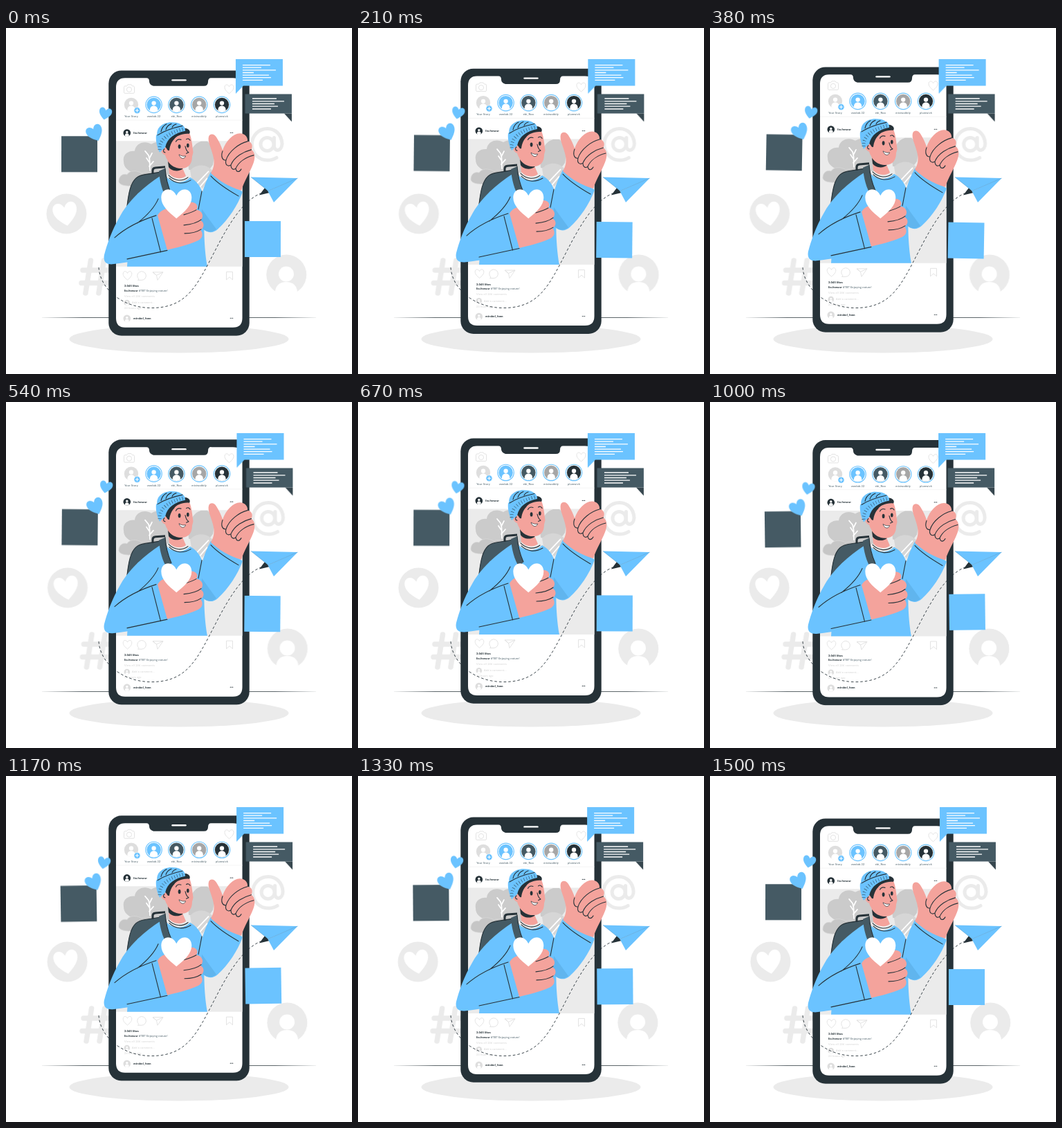
An HTML page that plays this animation: 500 px wide and 500 px high, repeating every 1540 ms.

```html
<!DOCTYPE html>
<html lang="en">
<head>
<meta charset="utf-8">
<title>Social phone</title>
<style>
  html, body { margin: 0; width: 100%; height: 100%; overflow: hidden; background: #fff; }
  svg { display: block; width: 100vw; height: 100vh; }
  text { font-family: Lato, sans-serif; font-size: 3.9px; letter-spacing: .2px; fill: #455a64; }
  .b { font-weight: 900; fill: #263238; }
  .pale text { fill: #d2d2d2; }
  .mid { text-anchor: middle; }
  .ink { fill: none; stroke: #263238; stroke-width: 1.1; stroke-linecap: round; stroke-linejoin: round; }
  .icon { fill: none; stroke: #e0e0e0; stroke-width: .9; stroke-linejoin: round; }
  .blue { fill: #6bc3ff; }
  .skin { fill: #f4a39c; }
  .gray { fill: #ebebeb; }
  .float, .shake, .wind { animation: float 1.5s linear infinite paused; transform-origin: 250px 250px; }
  .shake { animation-name: shake; }
  .wind { animation-name: wind; }
  @keyframes float { 50% { transform: translateY(-10px); } }
  @keyframes wind {
    25% { transform: rotate(1deg); }
    75% { transform: rotate(-1deg); }
  }
  @keyframes shake {
    10%, 90% { transform: translateX(-1px); }
    20%, 80% { transform: translateX(2px); }
    30%, 50%, 70% { transform: translateX(-4px); }
    40%, 60% { transform: translateX(4px); }
  }
</style>
</head>
<body>
<svg viewBox="0 0 500 500">
  <defs>
    <path id="heart" d="M0 .9C-.55 .5 -1 .1 -1 -.38C-1 -.98 -.28 -1.08 0 -.5C.28 -1.08 1 -.98 1 -.38C1 .1 .55 .5 0 .9Z"/>
    <g id="user">
      <circle r="1"/>
      <circle cy="-.22" r=".31" fill="#fff"/>
      <path d="M-.55 .83C-.57 .35 -.35 .15 0 .15S.57 .35 .55 .83A1 1 0 0 1 -.55 .83Z" fill="#fff"/>
    </g>
    <linearGradient id="fade">
      <stop offset="0" stop-color="#263238" stop-opacity=".1"/>
      <stop offset=".15" stop-color="#263238"/>
      <stop offset=".85" stop-color="#263238"/>
      <stop offset="1" stop-color="#263238" stop-opacity=".1"/>
    </linearGradient>
    <clipPath id="photo"><path d="M159 163.5H341.5V345H159Z"/></clipPath>
  </defs>

  <ellipse cx="250" cy="449.5" rx="158.5" ry="20" fill="#ebebeb"/>
  <path d="M52 418.2H448V418.9H52Z" fill="url(#fade)"/>

  <g class="shake">
    <circle class="gray" cx="87.5" cy="268.5" r="29"/>
    <use href="#heart" transform="translate(86 269) rotate(-10) scale(17.5 19)" fill="#fff"/>
    <circle class="gray" cx="405.3" cy="356.5" r="29"/>
    <circle cx="405" cy="355.5" r="11" fill="#fff"/>
    <path d="M388.5 386C388.5 373 394 367 405 367S421.5 373 421.5 386Z" fill="#fff"/>
    <path d="M122.5 336L115 383M141.5 336L134 383M111 350H151M109 368.5H149" fill="none" stroke="#ebebeb" stroke-width="7.5" stroke-linecap="round"/>
    <g fill="none" stroke="#ebebeb" stroke-width="5" stroke-linecap="round">
      <circle cx="377.5" cy="168" r="9.5"/>
      <path d="M387.5 158.500V170C387.5 180 399 178 399 167C398.5 154 389 145.5 378 145.5C365 145.5 355.5 155.5 355.5 168C355.5 181 365 191 378 191C383 191 387 190 391 187.5"/>
    </g>
  </g>

  <g class="float">
    <rect x="148.300" y="61.600" width="203.400" height="383.200" rx="18.500" fill="#263238"/>
    <path d="M172 72.500H203Q207 72.500 207 77.300T213 84H286Q292 84 292 78T297 72.500H328Q341.500 72.500 341.500 86V419.500Q341.500 433 328 433H172Q159 433 159 419.500V86Q159 72.500 172 72.500Z" fill="#fff"/>
    <path d="M240.500 75.500H259.500" stroke="#fff" stroke-width="2.400" stroke-linecap="round"/>

    <g class="icon">
      <path d="M172 84H174.500L176 82H181L182.500 84H184Q185.500 84 185.500 86V93Q185.500 94.500 184 94.500H172Q170.500 94.500 170.500 93V86Q170.500 84 172 84Z"/>
      <circle cx="178" cy="89" r="3.600"/>
      <use href="#heart" transform="translate(322.500 88.500) scale(6.500 7.200)" stroke-width=".13"/>
      <path d="M159 133.300H341.500" stroke="#efefef" stroke-width=".7"/>
      <use href="#heart" transform="translate(175.500 358) scale(6.300 7)" stroke-width=".13"/>
      <path d="M192 363A6.300 6.300 0 1 1 196 364.500L190.500 364.500Z"/>
      <path d="M212 353H227L219 364.500L217.500 357.500ZL217.500 357.500L227 353"/>
      <path d="M318.500 352.500H327.500V364L323 360L318.500 364Z"/>
    </g>

    <use href="#user" transform="translate(181 111) scale(10.200)" fill="#dedede"/>
    <circle cx="189.500" cy="119.300" r="4.600" class="blue" stroke="#fff" stroke-width=".7"/>
    <path d="M187 119.300H192M189.500 116.800V121.800" stroke="#fff" stroke-width="1"/>
    <g fill="none" stroke="#6bc3ff" stroke-width="1.200">
      <circle cx="213.600" cy="111" r="11.700"/><circle cx="246.400" cy="111" r="11.700"/>
      <circle cx="279.200" cy="111" r="11.700"/><circle cx="312" cy="111" r="11.700"/>
    </g>
    <use href="#user" transform="translate(213.600 111) scale(10.200)" fill="#6bc3ff"/>
    <use href="#user" transform="translate(246.400 111) scale(10.200)" fill="#455a64"/>
    <use href="#user" transform="translate(279.200 111) scale(10.200)" fill="#a6a6a6"/>
    <use href="#user" transform="translate(312 111) scale(10.200)" fill="#263238"/>
    <g class="mid">
      <text x="181" y="129.300">Your Story</text>
      <text x="213.600" y="129.300">vandob.32</text>
      <text x="246.400" y="129.300">ebi_Nox</text>
      <text x="279.200" y="129.300">mistwobbly</text>
      <text x="312" y="129.300">plumwick</text>
    </g>

    <use href="#user" transform="translate(174.800 151.700) scale(5.300)" fill="#263238"/>
    <text class="b" x="184.300" y="152.900">lio.fenwar</text>
    <path d="M324.300 151.500H328.500" stroke="#263238" stroke-width="1.200" stroke-linecap="round" stroke-dasharray="0 1.700"/>

    <text class="b" x="171" y="374.500">3.045 likes</text>
    <text x="171" y="381"><tspan class="b">lio.fenwar</tspan> #TBT Enjoying nature!</text>
    <g class="pale">
      <text x="171" y="389">View all 246 comments</text>
      <use href="#user" transform="translate(174.800 397.300) scale(4.300)" fill="#dedede"/>
      <text x="182" y="398.500">Add a comment...</text>
      <text x="171" y="406.500">24 hours ago</text>
    </g>
    <use href="#user" transform="translate(174.800 420) scale(5.300)" fill="#dedede"/>
    <text class="b" x="184.300" y="421">mirabel_fonn</text>
    <path d="M324.300 419.500H328.500" stroke="#263238" stroke-width="1.200" stroke-linecap="round" stroke-dasharray="0 1.700"/>

    <g clip-path="url(#photo)">
      <path d="M159 163H342V346H159Z" class="gray"/>
      <path d="M170 193C168 183 177 177 186 178C187 167 200 162 210 168C222 160 242 168 240 182V212H190C176 207 170 202 170 193Z" fill="#cbcbcb"/>
      <path d="M163 222C163 214 169 210 175 212C179 205 190 206 196 210C206 206 216 210 218 218L206 229C190 227 165 232 163 222Z" fill="#c6c6c6" stroke="#d9d9d9" stroke-width=".8"/>
      <path d="M264 205C262 185 268 168 282 164H291C300 171 302 185 299 198L290 210Z" fill="#cbcbcb"/>
      <path d="M266 206C276 196 290 196 300 208L284 232L268 218Z" fill="#d6d6d6"/>
      <path d="M208 206C207 196 209 192 206 184L201 178M207 189L211 181M207 194L203 188M207 200L213 193" fill="none" stroke="#fff" stroke-width="1.700" stroke-linecap="round"/>
      <path d="M274 227L293 207M280 230L291 217" stroke="#fff" stroke-width="1.800"/>
    </g>

    <!-- backpack -->
    <path d="M174 264C177 238 180 224 188 217Q193 213 200 212L230 207L242 250L198 278Z" fill="#455a64"/>
    <path class="ink" d="M174.500 262C177 238 180 224 188 217Q193 213 200 212L228 207.500"/>
    <path d="M212 211V206Q212 202.500 216 202.200L230 201" fill="none" stroke="#263238" stroke-width="3"/>

    <!-- torso and arms -->
    <path class="blue" d="M228 212C240 226 256 226 266 216C279 223 288 238 287 262C285 300 288 330 291 345H175L178 300L190 240Z"/>
    <path class="blue" d="M296 208C289 222 283 234 279 262L281 286C289 297 298 298 306 291C322 276 334 258 342 237Z"/>
    <path d="M283 262L304 291C295 298 286 294 281 286Z" fill="#60b5ee"/>
    <path class="ink" d="M296 214C307 226 322 235 336 243M283 236L278 262"/>
    <path class="blue" d="M228 211C205 225 180 246 166 270C152 294 146 313 142 328C140 338 145 342 154 341.500C181 339 210 332 234.500 324L219 268L236 245Z"/>
    <path class="ink" d="M157 303C175 287 195 278 217 271M175 334L233 321.500M211 275L223.500 324M190 282C205 270 215 259 220 247"/>
    <path d="M221 207L230 203C231 219 235 231 239 240L233 248C226 237 222 222 221 207Z" fill="#455a64"/>
    <path class="ink" d="M230 203C231 219 235 231 239 240"/>

    <!-- head -->
    <path class="skin" d="M231 184C236 195 235 208 236 211C243 219 255 219 260 214L253 198Z"/>
    <path class="ink" d="M235 213C244 222 255 222 263 216M236 217C245 226 257 226 267 220" stroke-width=".8"/>
    <path d="M234 193C239 200 246 204 256 203C250 209 238 207 235 201Z" fill="#263238"/>
    <path class="skin" d="M229 170C222 171 223 182 230 184C233 194 242 202.500 254 203C264 203 269 196 269 186L270.500 180C269 168 268 157 264 150L240 153Z"/>
    <path d="M226 172C227 160 236 151 259 145C265 146 267 150 265 153C255 152 246 156 243 161C239 165 237 170 236 177C232 179 233 170 226 172Z" fill="#263238"/>
    <path class="blue" d="M219 158C215 145 226 136.300 239 136.300C250 136.300 255 139 258 146L229 162Z"/>
    <path class="blue" d="M217 155C228 148 242 143 255 140.500Q259 143 259 149C244 152 233 159 230 173L222 180C218 172 216 162 217 155Z"/>
    <path class="ink" d="M219 155C229 148.500 243 144 255 141.500M224 150C225 145 228 141 232 139M231 147C232 143 235 140 239 138.500M240 144C241 141 243 140 246 139" stroke-width=".5"/>
    <path d="M222 176C221 161 236 151 257 146" fill="none" stroke="#263238" stroke-width="5" stroke-dasharray=".5 3.500"/>
    <ellipse cx="250.600" cy="171.500" rx="1.900" ry="3.100" fill="#263238"/>
    <ellipse cx="262.800" cy="170" rx="1.800" ry="3" fill="#263238"/>
    <path class="ink" d="M245.500 164.500C247 161.500 250 160.500 253 161.500M260.500 161C262.500 159.500 265 160 266 162.500" stroke-width="1.500"/>
    <path class="ink" d="M259 171C260 176 262 179 264 180L260.500 181.500M229 175C227 176 227 180 230 180" stroke-width=".9"/>
    <path d="M250 183C253 185 256 186 259.500 185C258.500 190 252 190 250 183Z" fill="#fff" stroke="#263238" stroke-width=".7"/>

    <!-- holding hand -->
    <path class="skin" d="M219 271C224 262 232 262 240 258L262 253C272 249 280 256 275 263C284 264 287 273 281 278C288 282 286 290 281 292C286 298 284 305 276 308C262 314 245 318 233 321Z"/>
    <path class="ink" d="M257 270C264 268 270 266 275 263M257 285C267 284 276 282 282 277M258 297C267 297 276 295 282 291"/>

    <!-- thumb up -->
    <path class="skin" d="M296 210C302 200 301 192 299 184C296 172 291 164 293 157C295 152 301 153 304 158C308 164 311 171 313 177C318 163 328 153 338 152.500C345 152.500 350 158 349 164C356 165 357 171 354.500 176C361 180 360 190 357 197C352 210 345 220 340 235C322 230 308 221 296 210Z"/>
    <path class="ink" d="M313 178C310 186 313 192 318 191C322 178 337 167 349 164M318 191C316 198 321 201 325 198C330 186 343 179 354.500 176M325 198C325 204 329 206 332 203C336 194 346 187 358 184M332 203C333 209 337 209 340 204" stroke-width="1.400"/>
  </g>

  <use href="#heart" transform="translate(246.300 254) scale(22 23.500)" fill="#fff"/>

  <path d="M134 346C136 377 168 404.500 210 404.500C262 404.500 276 372 302 322C322 283 342 250 368 239" fill="none" stroke="#263238" stroke-width=".9" stroke-dasharray="3.600 3"/>
  <path d="M366 241.500L374 231L381 238Z" fill="#263238"/>
  <path class="blue" d="M354 215.500L421.500 217L379 235.500Z"/>
  <path class="blue" d="M421.500 217L387 252L378.500 236Z"/>
  <path d="M354 215.500L379 235.500L421.500 217" fill="none" stroke="#3d8fc7" stroke-width=".5"/>

  <g class="shake">
    <path class="blue" d="M332 45H400V83.500H343L332 95Z"/>
    <path d="M342 53.700H382M342 57.200H369M342 60.800H390M342 64.500H358M342 68.200H380M342 71.700H383M342 75.300H371" stroke="#fff" stroke-width="1.300"/>
    <path d="M402 123.500H413V135.500Z" fill="#37474f"/>
    <path d="M345.500 95.500H413V123.500H345.500Z" fill="#455a64"/>
    <path d="M356 102H391M356 105.800H402M356 109.500H388M356 113.200H393M356 117H383" stroke="#fff" stroke-width="1.300"/>
  </g>

  <g class="wind">
    <rect x="80" y="156.300" width="52" height="52" fill="#455a64"/>
    <rect class="blue" x="345" y="279" width="52" height="52"/>
    <use class="blue" href="#heart" transform="translate(143.300 124) rotate(12) scale(9.200 9.700)"/>
    <use class="blue" href="#heart" transform="translate(128.800 152.300) rotate(-24) scale(11.800 13)"/>
  </g>
</svg>
<script>
  // Step the paused animations at 24 fps; the last of 37 steps repeats the first.
  const loop = 1540, steps = 36, cycle = 1500;
  const parts = document.getAnimations();
  const start = performance.now();
  function draw() {
    const t = (performance.now() - start) % loop;
    const step = Math.floor((t + 4.9) * steps / cycle) % steps;
    for (const part of parts) part.currentTime = (step + .25) * cycle / steps;
    requestAnimationFrame(draw);
  }
  draw();
</script>
</body>
</html>
```
